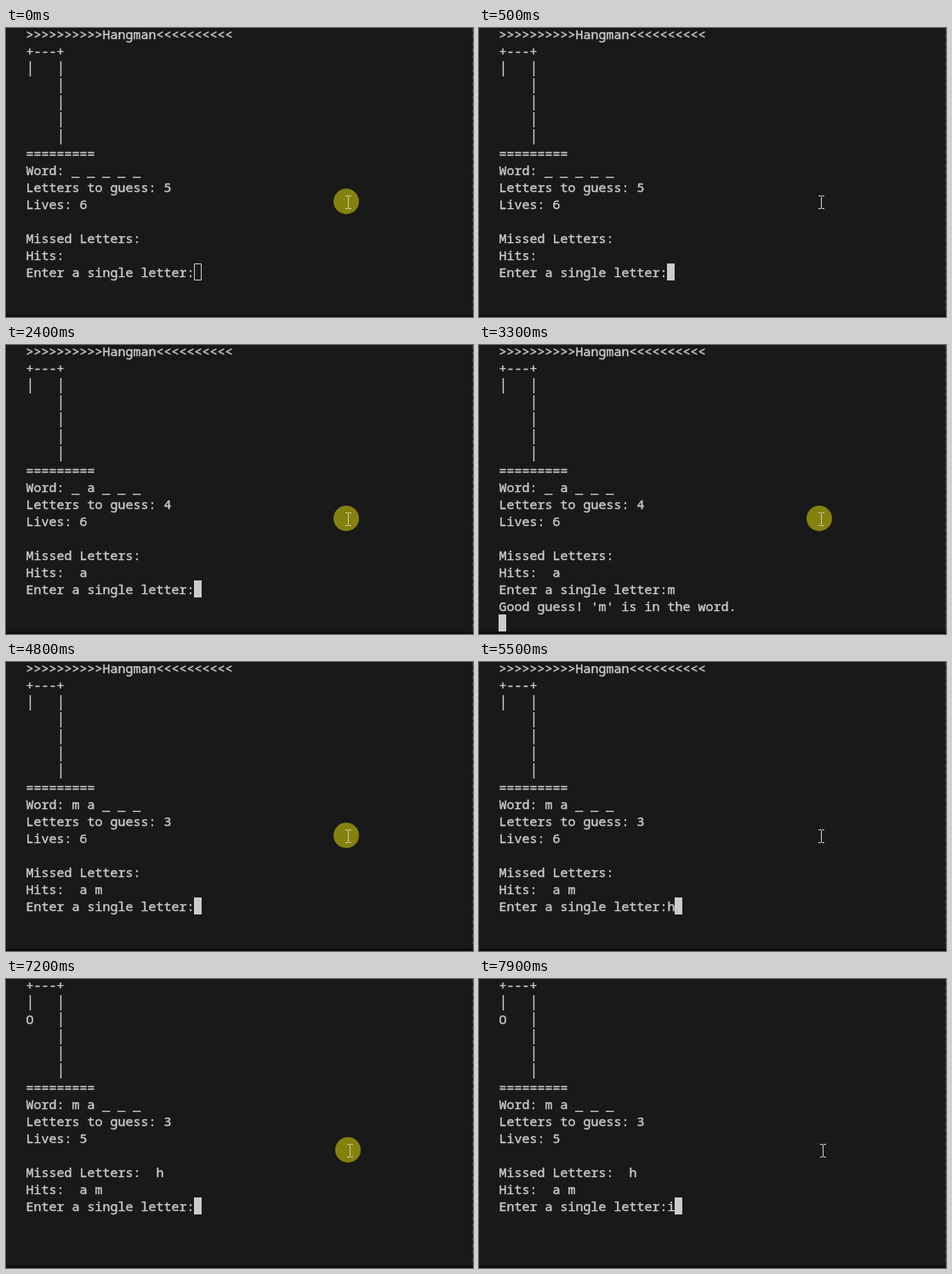
An HTML page with a canvas for the animation above (8 s loop, 549 by 340 pixels).

```html
<!DOCTYPE html>
<html lang="en">
<head>
<meta charset="utf-8">
<title>Hangman terminal</title>
<style>
  html, body { margin: 0; width: 100%; height: 100%; overflow: hidden; background: #191919; }
  canvas { display: block; }
</style>
</head>
<body>
<canvas id="stage" width="549" height="340"></canvas>
<script>
const ctx = document.getElementById('stage').getContext('2d');
const LOOP = 8000, ROUND = 2400;
const CELL = 9, ROW = 20, LEFT = 23, TOP = -3;
const INK = '#cccccc';

// Offsets inside one round
const FOCUS = 500, TYPED = 700, REPLY = 900;

const good = key => `Good guess! '${key}' is in the word.`;
const rounds = [
  { word: '_ _ _ _ _', left: 5, lives: 6, missed: '', hits: '', key: 'a', reply: good('a') },
  { word: '_ a _ _ _', left: 4, lives: 6, missed: '', hits: '  a', key: 'm', reply: good('m') },
  { word: 'm a _ _ _', left: 3, lives: 6, missed: '', hits: '  a m', key: 'h',
    reply: "Sorry, 'h' is not in the word. You have 6 lives left." },
  { word: 'm a _ _ _', left: 3, lives: 5, missed: '  h', hits: '  a m', key: 'i', reply: '' }
];

function screenLines(r, t) {
  const head = r.lives < 6 ? 'O' : ' ';
  const lines = [
    '>>>>>>>>>>Hangman<<<<<<<<<<',
    '+---+',
    '|   |',
    head + '   |',
    '    |',
    '    |',
    '    |',
    '=========',
    'Word: ' + r.word,
    'Letters to guess: ' + r.left,
    'Lives: ' + r.lives,
    '',
    'Missed Letters:' + r.missed,
    'Hits:' + r.hits,
    'Enter a single letter:' + (t >= TYPED ? r.key : '')
  ];
  if (t >= REPLY) lines.push(r.reply, '');
  return r.lives < 6 ? lines.slice(1) : lines;
}

function rect(x, y, w, h, color) {
  ctx.fillStyle = color;
  ctx.fillRect(x, y, w, h);
}

function drawLine(text, row) {
  const y = TOP + row * ROW;
  const plain = text.replace(/[|_]/g, ' ');
  ctx.fillStyle = ctx.strokeStyle = INK;
  // A hairline stroke thickens the regular weight
  ctx.lineWidth = 0.4;
  ctx.fillText(plain, LEFT + 0.6, y + 16);
  ctx.strokeText(plain, LEFT + 0.6, y + 16);
  // Tall bars and low full-width underscores
  [...text].forEach((c, i) => {
    const x = LEFT + i * CELL;
    if (c === '|') rect(x + 4.8, y + 2, 1.4, 18, INK);
    if (c === '_') rect(x, y + 18, CELL + 0.5, 1.3, INK);
  });
}

function drawCaret(col, row, hollow) {
  const x = LEFT + col * CELL, y = TOP + row * ROW;
  if (hollow) {
    ctx.strokeStyle = INK;
    ctx.lineWidth = 1;
    ctx.strokeRect(x + 0.5, y + 0.5, CELL - 1, ROW - 1);
  } else {
    rect(x, y, CELL, ROW, INK);
  }
}

function drawPointer(x, y, lit) {
  if (lit) {
    ctx.fillStyle = '#85810f';
    ctx.beginPath();
    ctx.arc(x, y, 15, 0, Math.PI * 2);
    ctx.fill();
  }
  const beam = lit ? '#d2cf9c' : '#d0d0d0';
  rect(x + 2, y - 6, 1, 14, beam);
  for (const dy of [-7, 8]) {
    rect(x - 1, y + dy, 3, 1, beam);
    rect(x + 3, y + dy, 3, 1, beam);
  }
}

function drawEdges() {
  for (let y = 0; y < 337; y += 8) rect(548, y, 1, 4, '#3a3a3a');
  rect(0, 337, 549, 3, '#120c12');
}

function draw() {
  const time = performance.now() % LOOP;
  const n = Math.floor(time / ROUND), t = time % ROUND;
  const lines = screenLines(rounds[n], t);
  const last = lines.length - 1;

  rect(0, 0, 549, 340, '#191919');
  ctx.font = '15px "Noto Sans Mono", monospace';
  ctx.lineJoin = 'round';
  lines.forEach(drawLine);
  drawCaret(lines[last].length, last, n === 0 && t < FOCUS);

  const moved = time >= 2 * ROUND + REPLY;
  drawPointer(moved ? 402 : 400, moved ? 201 : 204, t < FOCUS || t >= REPLY);
  drawEdges();
  requestAnimationFrame(draw);
}
draw();
</script>
</body>
</html>
```
